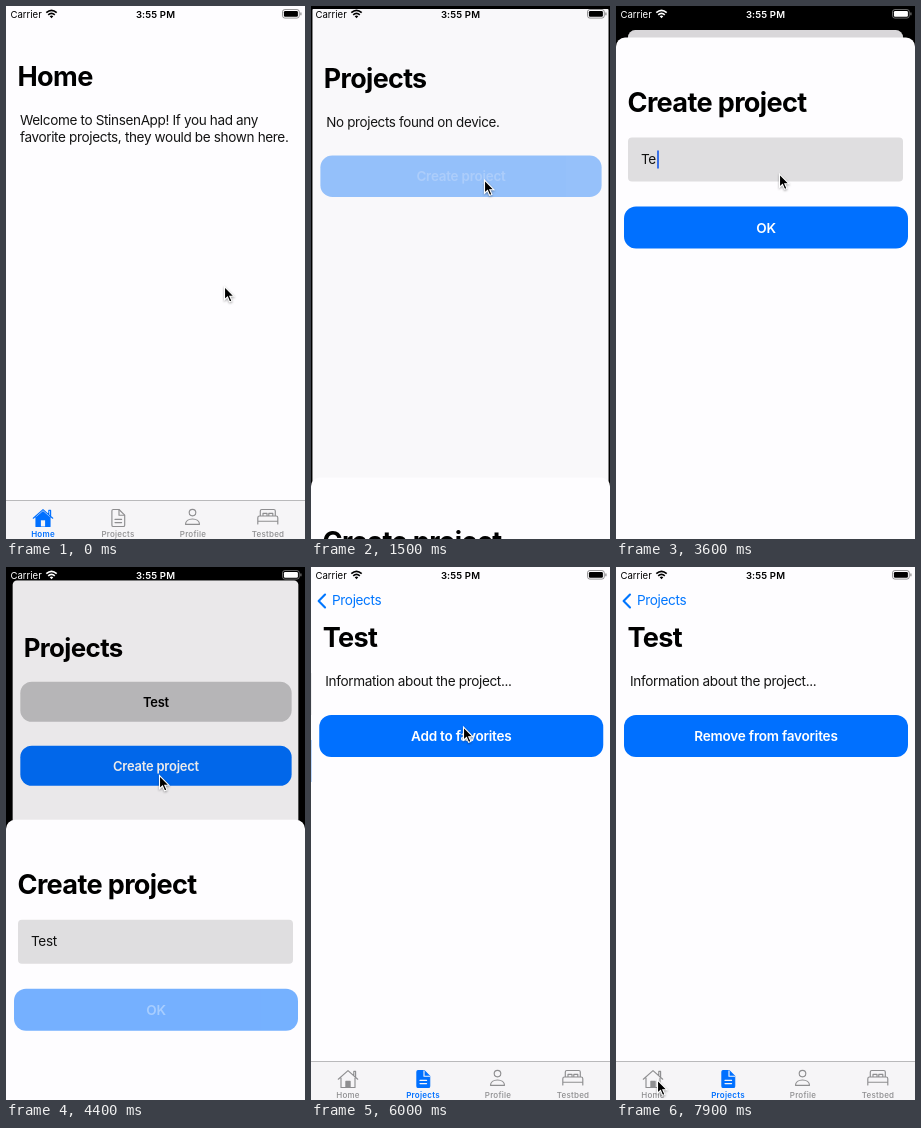
These frames come from a looping animation (299 by 533 pixels, 8 s). An HTML page:

```html
<!DOCTYPE html>
<html lang="en">
<head>
<meta charset="utf-8">
<title>Projects app</title>
<style>
  html, body { margin: 0; width: 100%; height: 100%; overflow: hidden; background: #000; }
  body { font: 400 13.55px/17.7px Inter, Roboto, sans-serif; letter-spacing: -.026em; color: #000; }
  #stage { position: absolute; left: 0; top: 0; width: 299px; height: 533px; overflow: hidden; background: #000; }
  #stage div, #stage svg { position: absolute; white-space: nowrap; }
  .fill, #page, #sheet { left: 0; top: 0; width: 299px; height: 533px; }
  #page { background: #fefdff; overflow: hidden; transform-origin: 50% 0; }
  #sheet { background: #fefdff; border-radius: 9px 9px 0 0; }
  #detail { background: #fefdff; }
  #dim { background: #0c0008; }
  .title { left: 11.5px; top: 53.9px; font-weight: 700; font-size: 27.1px; line-height: 34px; letter-spacing: -.024em; }
  .text { left: 14px; top: 105.7px; color: #141414; }
  .button { left: 8px; width: 284px; height: 42px; border-radius: 12px; background: #0070ff; color: #fff;
    text-align: center; line-height: 42px; font-weight: 600; letter-spacing: -.016em; }
  .button span { display: block; }
  #row { top: 105.6px; background: #c5c5c7; color: #000; }
  #back { left: 0; top: 25px; color: #0076ff; }
  #field { left: 12px; top: 100px; width: 275px; height: 43.5px; border-radius: 4px; background: #dfdee0; }
  #entry { left: 13px; top: 0; line-height: 43.5px; }
  #caret { top: 13px; width: 1.6px; height: 18px; background: #3b71e8; }
  #tabs { left: 0; top: 494px; width: 299px; height: 39px; background: #f6f5f7; }
  #tabs svg { left: 0; top: 0; }
  .tab { fill: none; stroke: #8e8e90; stroke-width: 1.15; stroke-linejoin: round; stroke-linecap: round; }
  .tab .door { fill: #8e8e90; }
  .tab.on { stroke: #0070ff; }
  .tab.on .solid { fill: #0070ff; }
  .tab.on .detail { stroke: #f6f5f7; }
  .tab.on .door { fill: #f6f5f7; stroke: none; }
  .label { width: 75px; top: 29px; text-align: center; font-size: 8px; line-height: 10px; font-weight: 500;
    letter-spacing: .03em; color: #8d8d8f; }
  .label.on { color: #0070ff; font-weight: 600; }
  #status { left: 0; top: 0; width: 299px; height: 20px; font-size: 9.57px; line-height: 17px; letter-spacing: 0; }
</style>
</head>
<body>
<div id="stage">
  <div id="page">
    <div id="home" class="fill">
      <div class="title">Home</div>
      <div class="text">Welcome to StinsenApp! If you had any<br>favorite projects, they would be shown here.</div>
    </div>
    <div id="list" class="fill">
      <div id="empty" class="text">No projects found on device.</div>
      <div id="row" class="button"><span>Test</span></div>
      <div id="create" class="button"><span>Create project</span></div>
    </div>
    <div id="listTitle" class="title">Projects</div>
    <div id="detail" class="fill">
      <div class="title">Test</div>
      <div class="text">Information about the project...</div>
      <div id="favorite" class="button" style="top:148px"><span></span></div>
    </div>
    <div id="back">
      <svg width="20" height="18" style="left:0;top:0"><path d="M14 2.5L7.6 9L14 15.5" fill="none" stroke="#0076ff" stroke-width="2.1" stroke-linecap="round" stroke-linejoin="round"/></svg>
      <div style="left:21px;top:0">Projects</div>
    </div>
    <div id="tabs">
      <svg width="299" height="39" viewBox="0 494 299 39">
        <path d="M0 494.5H299" stroke="#b9b9bb"/>
        <g class="tab">
          <path class="solid" d="M30 511L37 505l7 6v9.5H30z" stroke="none"/>
          <path d="M27.3 512.2L37 503.6l9.7 8.6M42.8 508.4v-4h1.8v5.6M30 511v9.5h14V511"/>
          <path class="door" d="M34.9 520.5v-6.2h4.2v6.2z"/>
        </g>
        <g class="tab">
          <path class="solid" d="M107.2 503.5H113l5.7 5.7v10q0 1.3-1.3 1.3h-10.2q-1.3 0-1.3-1.3v-14.4q0-1.3 1.3-1.3z"/>
          <path class="detail" d="M113 503.7v5.5h5.5M109 513.4h6.6M109 516.6h6.6"/>
        </g>
        <g class="tab">
          <circle cx="186.5" cy="506.6" r="3.3"/>
          <path d="M179.5 518.3c0-3.3 3-5.3 7-5.3s7 2 7 5.3z"/>
        </g>
        <g class="tab">
          <path d="M251.8 518v-6.3q0-1.7 1.7-1.7h16.6q1.7 0 1.7 1.7V518M251.8 515.2h20M254.3 510v-5q0-1.5 1.5-1.5h12q1.5 0 1.5 1.5v5M257 510v-2.7h4v2.7M262.8 510v-2.7h4v2.7"/>
        </g>
      </svg>
      <div class="label" style="left:-.5px">Home</div>
      <div class="label" style="left:74.5px">Projects</div>
      <div class="label" style="left:149.5px">Profile</div>
      <div class="label" style="left:224.5px">Testbed</div>
    </div>
    <div id="dim" class="fill"></div>
  </div>

  <div id="sheet">
    <div class="title" style="top:48.4px">Create project</div>
    <div id="field"><div id="entry"></div><div id="caret"></div></div>
    <div id="ok" class="button" style="top:169px"><span>OK</span></div>
  </div>

  <div id="status">
    <div style="left:4.5px;top:0">Carrier</div>
    <div style="left:0;top:0;width:299px;text-align:center;font-weight:600;letter-spacing:.015em">3:55 PM</div>
    <svg width="299" height="20" style="left:0;top:0" fill="none" stroke="currentColor">
      <path d="M40.3 6.7q5.2-4.6 10.4 0M42.2 8.8q3.3-2.8 6.6 0" stroke-width="1.7"/>
      <path d="M43.7 10.2q1.8-1.5 3.6 0l-1.8 2z" fill="currentColor" stroke="none"/>
      <rect x="276.5" y="3.5" width="16.8" height="8.6" rx="2.4" stroke-opacity=".45" stroke-width=".9"/>
      <rect x="277.9" y="4.9" width="14" height="5.8" rx="1.3" fill="currentColor" stroke="none"/>
      <path d="M294.9 6.4v2.8" stroke-opacity=".5" stroke-width="1.1"/>
    </svg>
  </div>

  <svg id="cursor" width="16" height="22" viewBox="-2 -2 16 22" style="left:-2px;top:-2px;filter:drop-shadow(0 1px 1px rgba(0,0,0,.35))">
    <path d="M.5 0V13.2L3.5 10.5L5.6 15.4L7.9 14.4L5.8 9.7H9.9Z" stroke="#fff" stroke-width="1.1"/>
  </svg>
</div>

<script>
const LOOP = 8000;
const SHEET_OPEN = 1468, SHEET_CLOSE = 4319, PUSH = 5485, FAVORITED = 6380;

const el = Object.fromEntries([...document.querySelectorAll('[id]')].map(e => [e.id, e]));
const icons = document.querySelectorAll('.tab');
const labels = document.querySelectorAll('.label');

// Pointer stops: time, x, y
const stops = [
  [100, 218, 280.5], [500, 115, 513], [700, 115, 513], [1250, 173, 174], [1550, 173, 174],
  [2000, 163, 169], [2200, 163, 168], [3800, 163, 168], [4200, 153, 208.5], [4500, 153, 208.5],
  [5200, 158, 126], [5520, 158, 126], [5950, 152, 160], [6450, 152, 160], [7000, 158, 164],
  [7100, 158, 164], [7800, 41, 513]
];
const typing = [[3300, 'T'], [3500, 'Te'], [3650, 'Tes'], [3800, 'Test']];

const clamp = v => Math.min(1, Math.max(0, v));
const smooth = v => v * v * (3 - 2 * v);

// Critically damped spring from 0 to 1
function spring(ms) {
  const x = Math.max(0, ms) * .01826;
  return 1 - (1 + x) * Math.exp(-x);
}

function pointerAt(t) {
  const i = stops.findIndex(s => s[0] > t);
  if (i < 0) return stops.at(-1).slice(1);
  if (i === 0) return stops[0].slice(1);
  const [a, b] = [stops[i - 1], stops[i]];
  const k = smooth((t - a[0]) / (b[0] - a[0]));
  return [a[1] + (b[1] - a[1]) * k, a[2] + (b[2] - a[2]) * k];
}

function press(button, t, down, up, fadeLabel = true) {
  const amount = t < up ? clamp((t - down) / 60) : 1 - clamp((t - up) / 280);
  const opacity = 1 - .6 * amount;
  button.style.opacity = opacity;
  if (fadeLabel) button.firstElementChild.style.opacity = opacity ** 1.6;
}

function selectTab(index) {
  for (const group of [icons, labels])
    group.forEach((item, i) => item.classList.toggle('on', i === index));
}

function drawPages(t) {
  const onHome = t < 700, hasProject = t >= 4300, pushing = t >= PUSH;
  selectTab(onHome ? 0 : 1);
  el.home.hidden = !onHome;
  el.list.hidden = el.listTitle.hidden = onHome;
  el.empty.hidden = hasProject;
  el.row.hidden = !hasProject;
  el.create.style.top = hasProject ? '173.3px' : '148px';
  press(el.create, t, 1280, 1510);
  press(el.row, t, 5320, 5510, false);

  const push = spring(t - PUSH);
  el.detail.hidden = el.back.hidden = !pushing;
  el.list.style.transform = `translateX(${-90 * push}px)`;
  el.listTitle.style.opacity = clamp(1.1 - 2 * push);
  el.detail.style.transform = `translateX(${299 * (1 - push)}px)`;
  el.back.style.transform = `translateX(${60 * (1 - push)}px)`;
  el.back.style.opacity = clamp(2 * push - 1);
  el.favorite.firstElementChild.textContent = t < FAVORITED ? 'Add to favorites' : 'Remove from favorites';
  press(el.favorite, t, 6220, FAVORITED);
}

function drawSheet(t) {
  const p = spring(t - SHEET_OPEN) - spring(t - SHEET_CLOSE);
  const shown = p > .001;
  el.page.style.transform = shown ? `translateY(${24 * p}px) scale(${1 - .08 * p})` : 'none';
  el.page.style.borderRadius = `${8 * p}px`;
  el.dim.style.opacity = .15 * p;
  el.sheet.hidden = !shown;
  el.sheet.style.transform = `translateY(${533 - 501.5 * p}px)`;
  el.status.style.color = t > 1550 && t < 4520 ? '#fff' : '#000';

  const typed = typing.findLast(([time]) => t >= time)?.[1];
  el.entry.textContent = typed || 'Name';
  el.entry.style.color = typed ? '#111' : '#a9a8ab';
  el.caret.hidden = t < 2400 || t > SHEET_CLOSE;
  el.caret.style.opacity = typed ? 1 : 1 - clamp((t - 2750) / 250);
  el.caret.style.left = `${typed ? 14 + el.entry.offsetWidth : 13.5}px`;
  press(el.ok, t, 4200, 4337);
}

function draw() {
  const t = performance.now() % LOOP;
  drawPages(t);
  drawSheet(t);
  const [x, y] = pointerAt(t);
  el.cursor.style.transform = `translate(${x}px, ${y}px)`;
  requestAnimationFrame(draw);
}
draw();
</script>
</body>
</html>
```
